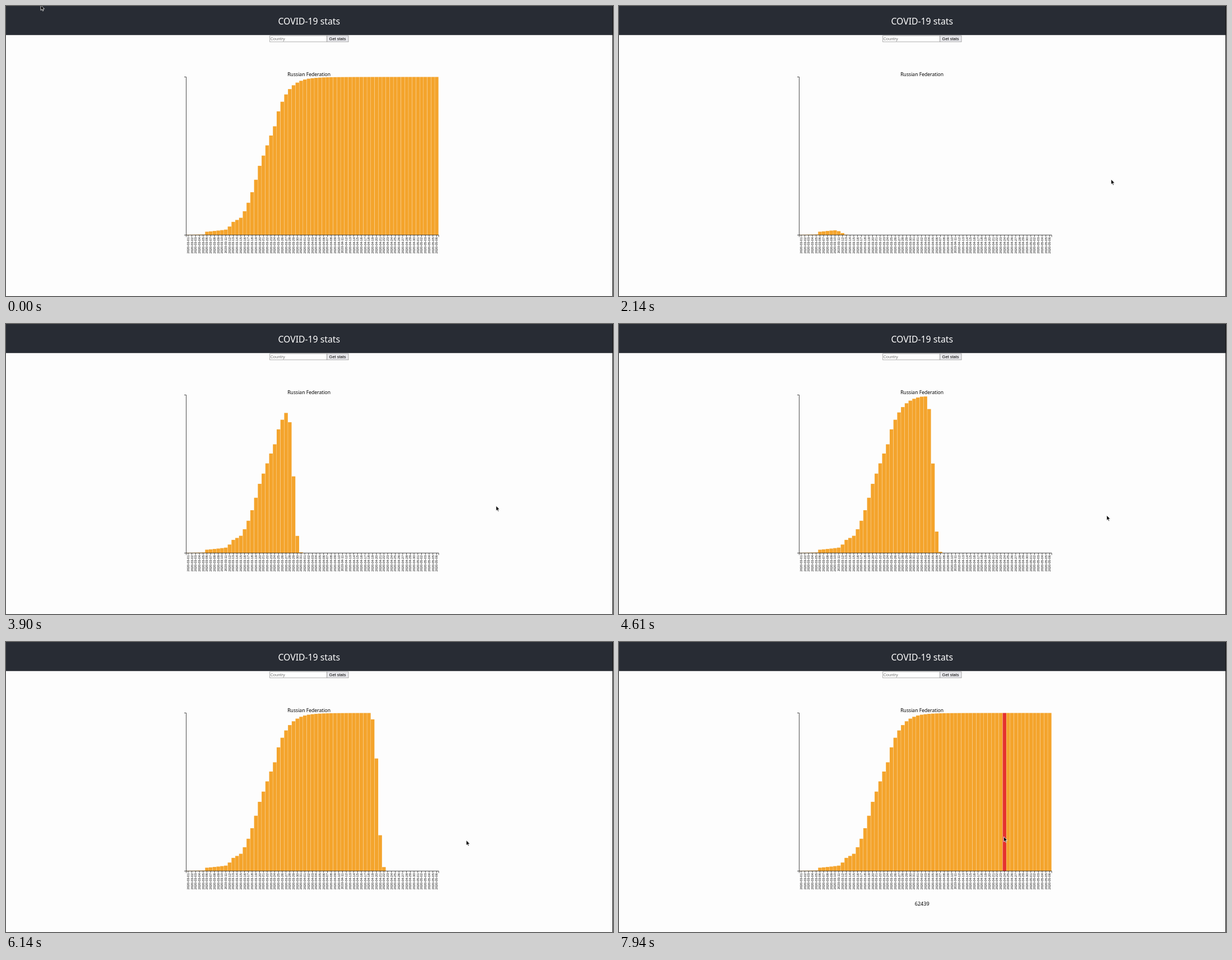
An HTML page for the animation above (7.99 s loop, 1083 by 517 pixels).

```html
<!DOCTYPE html>
<html lang="en">
<head>
<meta charset="utf-8">
<title>COVID-19 stats</title>
<style>
  html, body { margin: 0; width: 100%; height: 100%; overflow: hidden; background: #fdfdfd; }
  svg { display: block; width: 1083px; height: 517px; }
  .ui { font-family: "Noto Sans", sans-serif; text-anchor: middle; }
  .form { font: 7.5px "Liberation Sans", Arial, sans-serif; }
  .box { stroke: #8a8a8a; stroke-width: .7; }
  .axis { fill: none; stroke: #111; stroke-width: .75; }
  .labels { font: 5.64px "Liberation Sans", Arial, sans-serif; text-anchor: end; }
  .bars { fill: #f4a42c; }
  .bars .hover { fill: #e5322d; }
</style>
</head>
<body>
<svg viewBox="0 0 1083 517">
  <rect width="1083" height="517" fill="#fdfdfd"/>
  <rect width="1083" height="51.8" fill="#282c34"/>
  <rect x="1082" width="1" height="517" fill="#111"/>
  <text class="ui" x="540.7" y="32.9" font-size="15.75" fill="#fff">COVID-19 stats</text>
  <g class="form">
    <rect class="box" x="470.7" y="53" width="101.8" height="10.9" fill="#fff"/>
    <text x="471.4" y="61.1" fill="#757575">Country</text>
    <rect class="box" x="572.7" y="53" width="38.3" height="10.9" fill="#e9e9ed"/>
    <text x="576.6" y="61.1">Get stats</text>
  </g>
  <g id="chart">
    <g class="bars" id="bars"></g>
    <path class="axis" id="axis"/>
    <g class="labels" id="labels"></g>
    <text class="ui" x="540.7" y="124.8" font-size="8.58">Russian Federation</text>
    <text class="ui" id="value" x="540.7" y="469.6" font-size="9.1"></text>
  </g>
  <path id="cursor" d="M0 0V9.2L2.1 7.3L3.5 10.4L5 9.7L3.6 6.7H6.5Z"
        stroke="#fff" stroke-width=".8"/>
</svg>
<script>
const LOOP = 7990, CLEARED = 530, LOADED = 845, GROW_START = 849;
const STAGGER = 100, DURATION = 500;
const COUNT = 67, LEFT = 321.5, RIGHT = 771.7, TOP = 126.5, BASE = 408.3;
const STEP = (RIGHT - LEFT) / COUNT, FULL = BASE - TOP, MAX_CASES = 62443;

// Key points of the epidemic curve: day, logit of the share of all cases
const growth = [[0, -6.5], [4, -5.7], [5, -3.84], [10, -3.34], [12, -2.4], [14, -2.1],
  [19, -.25], [23, .79], [24, 1.28], [32, 4.5], [38, 6.5], [66, 12]];

// Key points of the pointer: time, x, y
const pointer = [[730, 62, -1.5], [1110, 270.8, 222], [2000, 878, 309], [3280, 878, 309],
  [5480, 865, 362], [6400, 804, 350], [7350, 804, 350], [7850, 686.5, 347]];

const byId = id => document.getElementById(id);
const clamp = v => Math.min(1, Math.max(0, v));
const cubicInOut = p => p < .5 ? 4 * p ** 3 : 1 - 4 * (1 - p) ** 3;

// Linear path through points [at, ...values], held at both ends
function along(points, at) {
  const next = Math.max(1, points.findIndex(p => p[0] > at));
  const n = at >= points.at(-1)[0] ? points.length - 1 : next;
  const [a, ...from] = points[n - 1], [b, ...to] = points[n];
  const p = clamp((at - a) / (b - a));
  return from.map((v, k) => v + (to[k] - v) * p);
}

const shareOn = day => 1 / (1 + Math.exp(-along(growth, day)[0]));

function add(parent, tag, attrs) {
  const node = document.createElementNS("http://www.w3.org/2000/svg", tag);
  for (const key in attrs) node.setAttribute(key, attrs[key]);
  return parent.appendChild(node);
}

let axisPath = `M318 ${TOP}H${LEFT}V${BASE}H318M${LEFT} ${BASE + 3.4}V${BASE}H${RIGHT + .3}v3.4`;
const bars = [];
for (let day = 0; day < COUNT; day++) {
  const x = LEFT + day * STEP, mid = x + STEP / 2;
  const node = add(byId("bars"), "rect", { x: x + .2, width: STEP - .32 });
  bars.push({ node, share: shareOn(day) });
  axisPath += `M${mid} ${BASE}v3.4`;
  const label = add(byId("labels"), "text", { transform: `translate(${mid + 2} 412.4) rotate(-90)` });
  label.textContent = new Date(Date.UTC(2020, 2, 1 + day)).toISOString().slice(0, 10);
}
byId("axis").setAttribute("d", axisPath);

function draw(t) {
  const loaded = t >= LOADED;
  const [px, py] = along(pointer, t);
  const pointed = Math.floor((px - LEFT) / STEP);
  let cases = "";
  byId("chart").style.display = t < CLEARED || loaded ? "" : "none";
  byId("cursor").setAttribute("transform", `translate(${px} ${py})`);
  bars.forEach(({ node, share }, day) => {
    const grown = loaded ? cubicInOut(clamp((t - GROW_START - day * STAGGER) / DURATION)) : 1;
    const height = FULL * share * grown;
    const hover = pointed === day && py >= BASE - height && py <= BASE;
    node.setAttribute("y", BASE - height);
    node.setAttribute("height", height);
    node.classList.toggle("hover", hover);
    if (hover) cases = Math.round(MAX_CASES * share);
  });
  byId("value").textContent = cases;
}

const start = performance.now();
function tick() {
  draw((performance.now() - start) % LOOP);
  requestAnimationFrame(tick);
}
tick();
</script>
</body>
</html>
```
